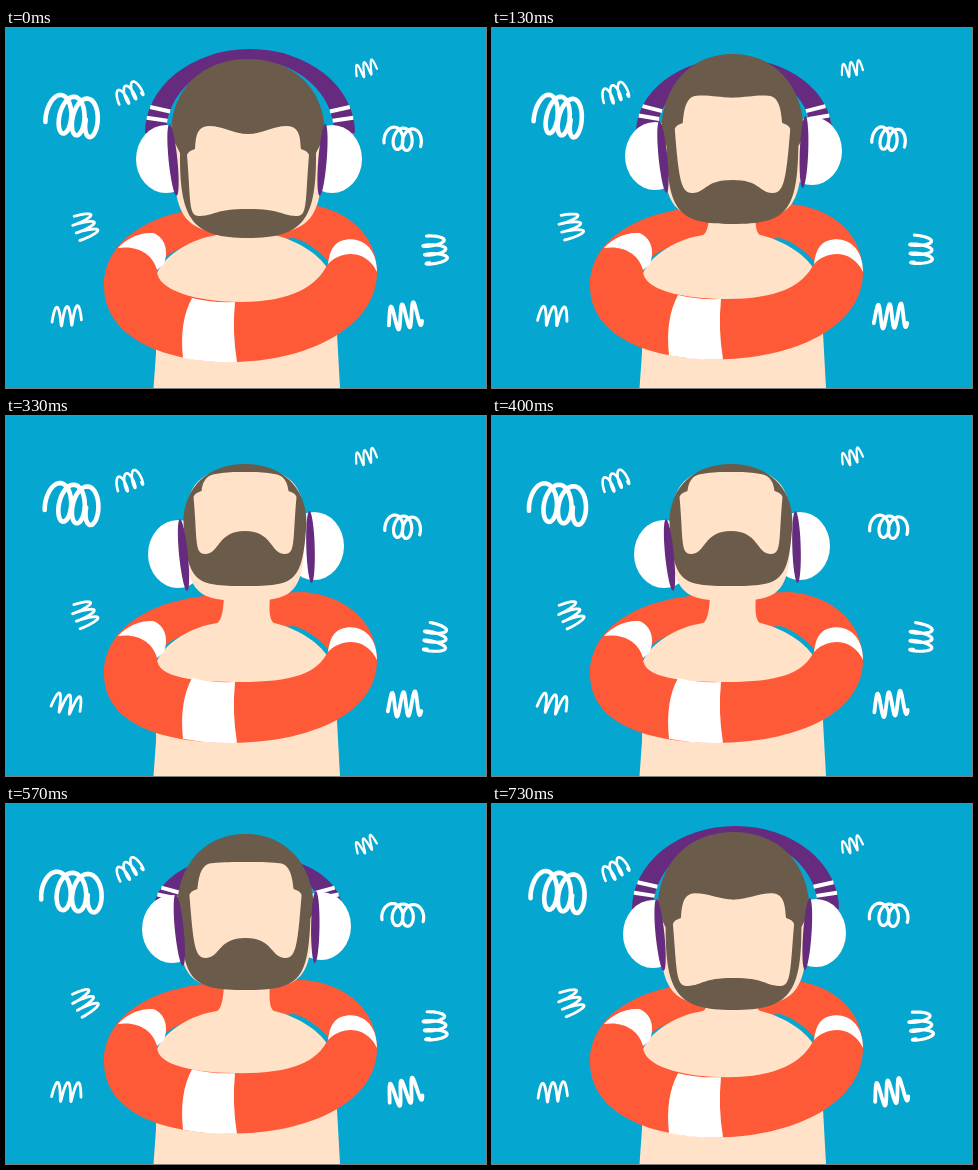
Recreate the animation shown at these times as an HTML page with a canvas. Size 480 by 360 pixels, loop 760 ms.

```html
<!DOCTYPE html>
<html lang="en">
<head>
<meta charset="utf-8">
<title>Nodding head with headphones</title>
<style>
html, body { margin: 0; width: 100%; height: 100%; overflow: hidden; background: #05a6cf; }
canvas { display: block; }
</style>
</head>
<body>
<canvas id="stage" width="480" height="360"></canvas>
<script>
const ctx = document.getElementById('stage').getContext('2d');
const LOOP = 760, STEP = 100 / 3, TAU = Math.PI * 2;
const BLUE = '#05a6cf', ORANGE = '#ff5a38', SKIN = '#ffe2c7', HAIR = '#6a5b4a', PURPLE = '#662a7f', WHITE = '#fff';

// Nod amount (0 = looking down, 1 = head back) by animation step
const NOD_STEPS = [0, 2, 4, 7, 10, 12, 14, 17, 20, 22, 23];
const NOD = [0, .14, .375, .825, 1, 1, .875, .6, .28, .1, 0];

// Head and headphone measures by nod amount
const POSE_AT = [0, .1, .375, .6, .825, 1];
const POSE = {
  cx: [242, 241.5, 240.5, 239.5, 240, 239],
  w: [77, 76, 71.5, 68.5, 65, 61.5],
  top: [31, 28, 26, 30, 38, 48],
  hairline: [98, 89, 67, 58, 54, 56],
  notch: [123, 116, 97, 87, 80, 77],
  lip: [181, 174, 152, 134, 122, 115],
  corner: [188, 182, 165, 154, 143, 138],
  chin: [210, 206, 196, 186, 178, 170],
  cupL: [130, 131, 133, 136, 139, 142],
  cupR: [356, 354, 350, 345, 342, 338],
  cupLY: [131, 130, 128, 125, 130, 138],
  cupRY: [131, 129, 123, 122, 126, 130],
  bandL: [139, 140, 144, 148, 154, 160],
  bandR: [349, 347, 340, 336, 328, 320],
  bandTop: [21, 22, 30, 50, 79, 105]
};

// x, y, length, height, turns, loop radius, angle, line width, phase
const SQUIGGLES = [
  [69, 88, 43, 38, 3.1, 9.5, .12, 4.6, .7],
  [124, 65, 25, 17, 3, 2.5, -.5, 2.6, .3],
  [360, 41, 21, 14, 2.7, .5, -.35, 2.2, .25],
  [397, 111, 25, 22, 2.7, 7, .1, 3.2, .75],
  [79, 199, 25, 21, 3, 1.5, 1.1, 2.8, .2],
  [61, 288, 28, 19, 2.7, 1, .05, 2.8, .45],
  [429, 223, 27, 22, 3, 2.5, 1.5, 3.2, .4],
  [399, 288, 34, 24, 3, 0, -.15, 3.8, .3]
];

function lookup(keys, values, k) {
  let i = 1;
  while (i < keys.length - 1 && keys[i] < k) i++;
  const f = (k - keys[i - 1]) / (keys[i] - keys[i - 1]);
  return values[i - 1] + (values[i] - values[i - 1]) * f;
}

function fill(color, path) {
  ctx.fillStyle = color;
  ctx.fill(new Path2D(path));
}

function ellipse(color, x, y, rx, ry, angle = 0) {
  ctx.fillStyle = color;
  ctx.beginPath();
  ctx.ellipse(x, y, rx, ry, angle, 0, TAU);
  ctx.fill();
}

// Fills a right-hand half and its mirror image
function mirrored(cx, color, path) {
  for (const side of [1, -1]) {
    ctx.save();
    ctx.translate(cx, 0);
    ctx.scale(side, 1);
    fill(color, path);
    ctx.restore();
  }
}

function squiggle([x, y, len, h, turns, r, angle, width, phase], cycle) {
  const wave = Math.cos(TAU * (cycle - phase));
  const isCoil = r > 5;
  const stretch = isCoil ? 1 + .12 * wave : 1;
  const lean = isCoil ? 0 : .1;
  const turn = angle + (isCoil ? -.05 : .13) * wave;
  const cos = Math.cos(turn), sin = Math.sin(turn);
  ctx.beginPath();
  for (let s = 0; s <= 1; s += .01) {
    const a = TAU * turns * s + 2.6;
    const v = h / 2 * Math.sin(a);
    const u = (len * (s - .5) + r * Math.cos(a)) * stretch - lean * v;
    ctx.lineTo(x + u * cos - v * sin, y + u * sin + v * cos);
  }
  ctx.strokeStyle = WHITE;
  ctx.lineWidth = width;
  ctx.lineCap = ctx.lineJoin = 'round';
  ctx.stroke();
}

function ringBackAndBody() {
  fill(ORANGE, 'M98 258C98 214 142 180 225 178L298 176C342 180 371 208 371 244L322 262H150Z');
  fill(BLUE, 'M148 246C154 232 162 225 176 220L288 210C304 215 315 225 324 235L315 262H160Z');
  fill(SKIN, 'M147.5 360L150 325L151 245C160 226 185 211 211 207Q217 204 218 180H264Q262 204 268 207C290 212 312 225 322 241L331 305L334 360Z');
}

function ringFront(lift) {
  const inner = 274 - lift, outer = 334 - lift * .9;
  fill(ORANGE, `M98 258C98 240 105 228 113 219C133 217 147 227 151 242C150 262 190 ${inner} 235 ${inner}C285 ${inner} 312 258 322 235
    C335 222 360 221 371 244C371 300 300 ${outer} 225 ${outer}C150 ${outer} 98 305 98 258Z`);
  fill(WHITE, `M186 ${inner - 4}Q205 ${inner + 1} 229 ${inner}Q226 ${inner + 30} 231 ${outer}Q202 ${outer + 1} 177 ${outer - 4}Q173 ${inner + 20} 186 ${inner - 4}Z`);
  fill(WHITE, 'M112 220C122 209 135 204 147 205C159 209 163 223 158 236L151 242C147 227 133 217 112 220Z');
  fill(WHITE, 'M322 236Q324 217 335 213C352 207 371 217 371 244C360 221 335 222 322 236Z');
}

function headband(m, nod) {
  const base = 105, cx = (m.bandL + m.bandR) / 2, rx = (m.bandR - m.bandL) / 2, ry = base - m.bandTop;
  if (ry < 2) return;
  const inX = rx - 21, inY = Math.max(1, ry - 11);
  fill(PURPLE, `M${m.bandL} ${base}A${rx} ${ry} 0 0 1 ${m.bandR} ${base}H${cx + inX}A${inX} ${inY} 0 0 0 ${cx - inX} ${base}Z`);
  ctx.strokeStyle = WHITE;
  ctx.lineWidth = 4;
  ctx.lineCap = 'butt';
  for (const side of [1, -1]) {
    for (const degrees of [18, 10.5]) {
      const a = (degrees + 8 * nod) * TAU / 360;
      ctx.beginPath();
      ctx.moveTo(cx + side * rx * Math.cos(a), base - ry * Math.sin(a));
      ctx.lineTo(cx + side * inX * Math.cos(a), base - inY * Math.sin(a) + 1);
      ctx.stroke();
    }
  }
}

function cups(m) {
  ellipse(WHITE, m.cupL + 30, m.cupLY, 30, 34);
  ellipse(WHITE, m.cupR - 30, m.cupRY, 30, 34);
}

function pads(m, nod) {
  ellipse(PURPLE, 167 + 10.5 * nod, m.cupLY + 1, 4.4, 36, -.1);
  ellipse(PURPLE, 316.5 - 12 * nod, m.cupRY + 1, 4.2, 36, .08 - .11 * nod);
}

function head(m, nod) {
  const { w, top, hairline, notch, lip, corner, chin } = m;
  const jaw = Math.max(chin - 4, 185);
  mirrored(m.cx, SKIN, `M-1 ${top + 5}C${.6 * w} ${top + 5} ${w - 3} 60 ${w - 2} 105C${w - 1} ${jaw - 10} ${.85 * w} ${jaw} 0 ${jaw}H-1Z`);

  const side = 107, indent = 9 * (1 - nod);
  const inner = w - 16 + 6 * nod;
  const mouth = 48 - 9 * Math.min(1, nod * 2.5);
  const dip = 8 * Math.max(0, 1 - nod * 1.8);
  mirrored(m.cx, HAIR, `M-1 ${top}H0C${.58 * w} ${top} ${w} ${top + .38 * (side - top)} ${w} ${side}
    L${w - indent} ${side + 18 * (1 - nod)}
    C${w - 4 - indent / 2} ${chin - 18 + 15 * nod} ${(.72 + .1 * nod) * w} ${chin} 0 ${chin}H-1V${lip}H0
    C${.7 * mouth} ${lip} ${.65 * mouth} ${corner - 1} ${mouth} ${corner}
    C${mouth + 12} ${corner + 1} ${inner - 4} ${corner - 14} ${inner} ${notch + 4}
    Q${inner - 1} ${notch} ${inner - 8} ${notch - 2}
    C${inner - 9} ${notch - 10} ${inner - 8 - 4 * nod} ${hairline + 3 * nod} ${inner - 22} ${hairline + 2 * nod}
    C${inner - 36} ${hairline} 14 ${hairline + dip} 0 ${hairline + dip}H-1Z`);
}

function draw(time) {
  const step = Math.floor((Math.floor(time % LOOP / 10) * 10 + 3.4) / STEP);
  const nod = lookup(NOD_STEPS, NOD, step);
  const m = {};
  for (const key in POSE) m[key] = lookup(POSE_AT, POSE[key], nod);

  ctx.fillStyle = BLUE;
  ctx.fillRect(0, 0, 480, 360);
  SQUIGGLES.forEach(s => squiggle(s, step / 23));
  ringBackAndBody();
  ringFront(8 * nod);
  headband(m, nod);
  cups(m);
  head(m, nod);
  pads(m, nod);
}

function tick() {
  draw(performance.now());
  requestAnimationFrame(tick);
}
tick();
</script>
</body>
</html>
```
